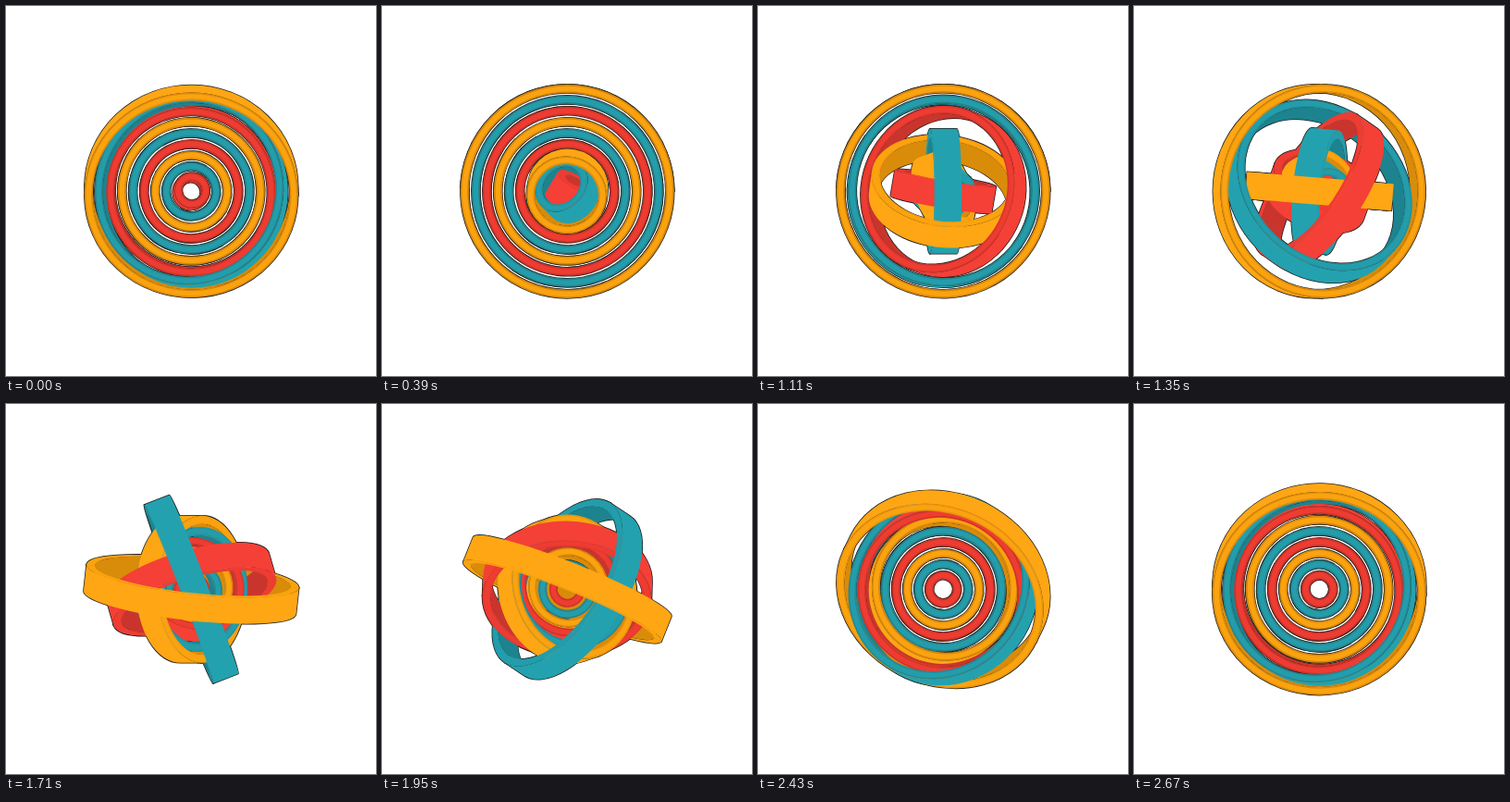
Recreate the animation shown at these times as an HTML page with a canvas. Size 400 px wide and 400 px high, loop 2.7 s.

```html
<!DOCTYPE html>
<html lang="en">
<head>
<meta charset="utf-8">
<title>Gyroscope rings</title>
<style>
  html, body { margin: 0; width: 100%; height: 100%; overflow: hidden; background: #fff; }
  canvas { display: block; width: 100vmin; height: 100vmin; }
</style>
</head>
<body>
<canvas id="stage" width="400" height="400"></canvas>
<script>
const ctx = document.getElementById('stage').getContext('2d');
const LOOP = 2700, LEAD = 640, STAGGER = 160, FIRST = 550;
const DEPTH = 29, THICK = 9, PITCH = 12;
const Q = Math.PI / 2;

// Each colour: outer wall, rim, inner wall
const COLORS = [
  ['#f44036', '#ee3c32', '#c9352d'],
  ['#24a1ae', '#239dab', '#1c838f'],
  ['#ffa614', '#fba30f', '#d98b0a']
];

// Tilt in degrees against ms from the edge-on moment
const TILT = [
  [-600, 0], [-480, 16], [-320, 37], [-160, 68], [-110, 82], [0, 90],
  [100, 95], [200, 108], [360, 127], [840, 162], [1060, 170], [1300, 180]
];

// Heading of each ring's leading side at these moments, inner to outer
const TURN_AT = [-480, -80, 360, 900];
const TURNS = [
  [130, 120, 90, 60],
  [45, 45, 45, 30],
  [280, 338, 340, 300],
  [260, 275, 290, 300],
  [0, 0, 10, -30],
  [85, 104, 0, -45],
  [20, 36, 90, 120],
  [125, 145, 220, 215],
  [180, 94, 135, 90]
];

const slope = (a, b) => (b[1] - a[1]) / (b[0] - a[0]);

// Cubic Hermite through the keys, at rest at both ends
function curve(keys, t) {
  const last = keys.length - 1;
  if (t <= keys[0][0]) return keys[0][1];
  if (t >= keys[last][0]) return keys[last][1];
  let i = 0;
  while (t > keys[i + 1][0]) i++;
  const tangent = k => k === 0 || k === last ? 0 : slope(keys[k - 1], keys[k + 1]);
  const [t0, v0] = keys[i], [t1, v1] = keys[i + 1];
  const span = t1 - t0, u = (t - t0) / span, w = 1 - u;
  return w * w * (1 + 2 * u) * v0 + u * u * (3 - 2 * u) * v1 +
    span * u * w * (w * tangent(i) - u * tangent(i + 1));
}

function heading(turns, t) {
  if (t <= TURN_AT[0]) return turns[0];
  for (let i = 1; i < TURN_AT.length; i++) {
    if (t < TURN_AT[i]) {
      const u = (t - TURN_AT[i - 1]) / (TURN_AT[i] - TURN_AT[i - 1]);
      return turns[i - 1] + (turns[i] - turns[i - 1]) * u * u * (3 - 2 * u);
    }
  }
  return turns[turns.length - 1];
}

function pose(i, time) {
  const edge = FIRST + STAGGER * i;
  const t = ((time - edge + LEAD) % LOOP + LOOP) % LOOP - LEAD;
  const tilt = curve(TILT, t);
  const past = tilt > 90;
  const eps = (past ? 180 - tilt : tilt) * Math.PI / 180;
  return {
    angle: (heading(TURNS[i], t) + (past ? 180 : 0)) * Math.PI / 180,
    cos: Math.max(Math.cos(eps), 0),
    shift: DEPTH / 2 * Math.sin(eps),
    outer: 19.5 + PITCH * i,
    inner: 19.5 + PITCH * i - THICK,
    color: COLORS[i % 3]
  };
}

// Strip between two arcs, each given as [centre x, radius]
function strip(p, a, b, from, to) {
  ctx.beginPath();
  ctx.ellipse(a[0], 0, a[1] * p.cos, a[1], 0, from, to);
  ctx.ellipse(b[0], 0, b[1] * p.cos, b[1], 0, to, from, true);
  ctx.closePath();
}

function half(p, near, outline) {
  const from = near ? -Q : Q - 0.03, to = near ? Q : 3 * Q + 0.03;
  const r = near ? p.outer : p.inner;
  const paint = fill => {
    if (outline) ctx.stroke();
    else { ctx.fillStyle = fill; ctx.fill(); }
  };
  ctx.save();
  ctx.rotate(p.angle);
  strip(p, [-p.shift, r], [p.shift, r], from, to);
  paint(p.color[near ? 0 : 2]);
  strip(p, [-p.shift, p.outer], [-p.shift, p.inner], from, to);
  paint(p.color[1]);
  if (!outline) {
    ctx.strokeStyle = `rgba(60,20,0,${0.2 * p.cos ** 4})`;
    ctx.lineWidth = 1.6;
    for (const edge of [p.outer - 0.9, p.inner + 0.9]) {
      ctx.beginPath();
      ctx.ellipse(-p.shift, 0, edge * p.cos, edge, 0, from, to);
      ctx.stroke();
    }
  }
  ctx.restore();
}

function draw(time) {
  const rings = TURNS.map((_, i) => pose(i, time));
  ctx.setTransform(1, 0, 0, 1, 0, 0);
  ctx.fillStyle = '#fff';
  ctx.fillRect(0, 0, 400, 400);
  ctx.translate(200.3, 200.3);
  ctx.lineJoin = 'round';
  for (const outline of [true, false]) {
    ctx.strokeStyle = '#1c1c1c';
    ctx.lineWidth = 1.5;
    // Far halves from the outside in, near halves from the inside out
    for (let i = rings.length - 1; i >= 0; i--) half(rings[i], false, outline);
    for (const ring of rings) half(ring, true, outline);
  }
}

function tick() {
  draw(performance.now() % LOOP);
  requestAnimationFrame(tick);
}
tick();
</script>
</body>
</html>
```
